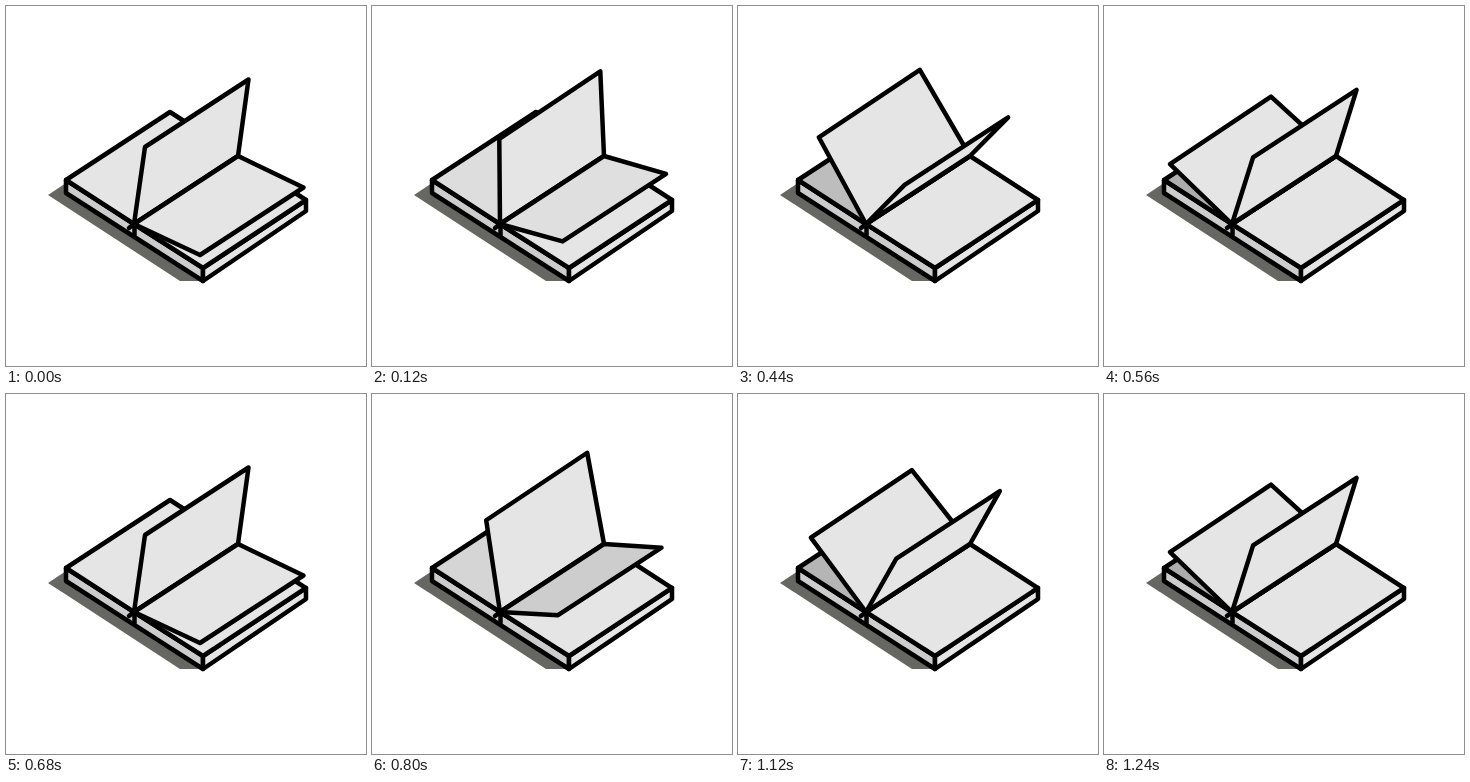
These frames come from a looping animation (360 px wide and 360 px high, 1.28 s). An HTML page:

```html
<!DOCTYPE html>
<html lang="en">
<head>
<meta charset="utf-8">
<title>Turning pages</title>
<style>
  html, body { margin: 0; width: 100%; height: 100%; overflow: hidden; background: #fff; }
  svg { display: block; width: 100vw; height: 100vh; }
  .ink { stroke: #000; stroke-width: 4.5; stroke-linejoin: round; stroke-linecap: round; fill: #e5e5e5; }
</style>
</head>
<body>
<svg viewBox="0 0 360 360">
  <path d="M42 189L60 177V187L197 275H174Z" fill="#666662"/>
  <g class="ink">
    <path d="M60 174L128 218L197 262V275L60 187Z" style="fill:#ccc"/>
    <path d="M197 262L300 194V205L197 275Z"/>
    <path id="left" d="M60 174L164 106L232 150L128 218Z"/>
    <path d="M128 218L232 150L300 194L197 262Z"/>
    <path d="M128 218L123 222M128.500 218V229"/>
    <path id="back"/>
    <path id="front"/>
  </g>
</svg>
<script>
  const STEP = 80, COUNT = 8, LIGHT = 229;
  const NEAR = { x: 128, y: 218 }, FAR = { x: 232, y: 150 };

  // Path of a page's free corner, relative to the near end of the spine.
  // The first and last points only shape the curve.
  const ARC = [[69, 80], [66, 31], [46, -25], [11, -77], [-38, -94], [-68, -46], [-83, 8]];

  const [left, back, front] = ["left", "back", "front"].map(id => document.getElementById(id));
  const grey = v => `rgb(${v},${v},${v})`;

  // Catmull-Rom spline through four neighbouring values.
  const spline = (a, b, c, d, t) =>
    b + t / 2 * (c - a + t * (2 * a - 5 * b + 4 * c - d + t * (3 * (b - c) + d - a)));

  function corner(turn) {
    const pos = turn * (ARC.length - 3), i = Math.floor(pos);
    return [0, 1].map(axis => spline(...ARC.slice(i, i + 4).map(p => p[axis]), pos - i));
  }

  function setPage(el, turn) {
    const [dx, dy] = corner(turn);
    const x = NEAR.x + dx, y = NEAR.y + dy;
    const run = dx < 0 ? 101 : 103.5;
    el.setAttribute("d", `M${NEAR.x} ${NEAR.y}L${x} ${y}l${run} -67.5L${FAR.x} ${FAR.y}Z`);
  }

  let shown = -1;
  function draw() {
    const k = Math.floor(performance.now() / STEP) % COUNT;
    if (k !== shown) {
      shown = k;
      setPage(front, k / COUNT / 2);
      setPage(back, (k + COUNT) / COUNT / 2);
      left.style.fill = grey(LIGHT - 8 * k);
      // The upper side darkens until the page is edge-on, then the light underside shows.
      front.style.fill = grey(k > COUNT / 2 ? LIGHT : LIGHT - 6 * k * k);
    }
    requestAnimationFrame(draw);
  }
  draw();
</script>
</body>
</html>
```
